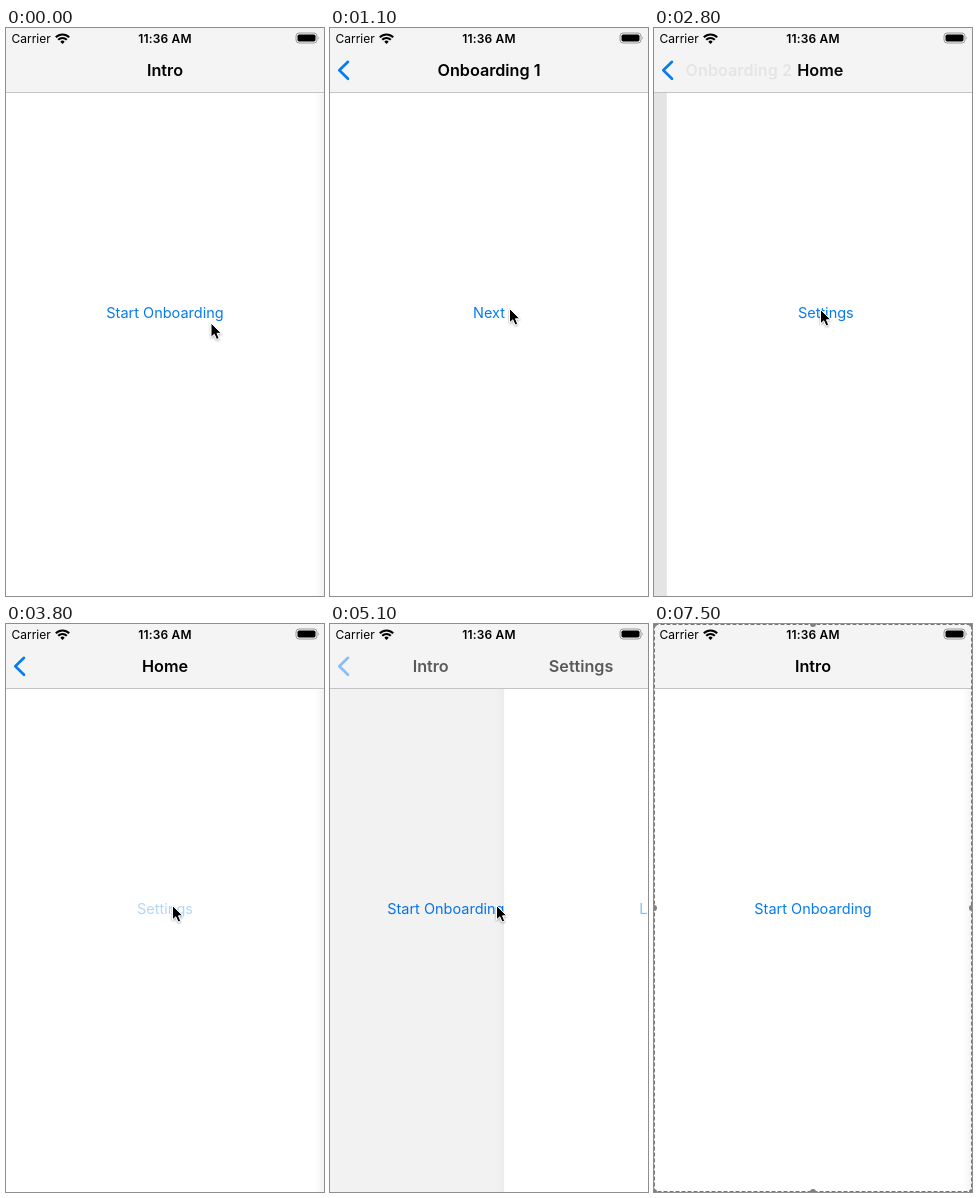
Animation, 318 px wide and 568 px high, one loop 7.6 s. Source, as an HTML page:

```html
<!DOCTYPE html>
<html lang="en">
<head>
<meta charset="utf-8">
<title>Onboarding flow</title>
<style>
  html, body { margin: 0; width: 100%; height: 100%; overflow: hidden; background: #fff; }
  svg { display: block; width: 318px; height: 568px; font-family: Inter, Roboto, sans-serif; }
  .button { font-size: 14.5px; fill: #067af0; text-anchor: middle; }
  .title { font-size: 16.2px; font-weight: 600; text-anchor: middle; }
  .status { font-size: 12px; }
  .clock { font-weight: 600; letter-spacing: .15px; text-anchor: middle; }
</style>
</head>
<body>
<svg viewBox="0 0 318 568">
  <defs>
    <linearGradient id="edge">
      <stop offset="0" stop-opacity="0"/>
      <stop offset="1" stop-opacity=".05"/>
    </linearGradient>
    <filter id="soft" x="-50%" y="-50%" width="200%" height="200%">
      <feDropShadow dx="0" dy="1" stdDeviation="1" flood-opacity=".35"/>
    </filter>
  </defs>

  <g id="under">
    <rect width="318" height="568" fill="#fff"/>
    <text class="button" x="159" y="289.7"></text>
  </g>
  <rect id="dim" width="318" height="568"/>
  <g id="over">
    <rect id="shadow" x="-9" width="9" height="568" fill="url(#edge)"/>
    <rect width="318" height="568" fill="#fff"/>
    <text class="button" x="159" y="289.7"></text>
  </g>

  <rect width="318" height="64" fill="#f4f4f4"/>
  <rect y="64" width="318" height="1" fill="#c4c4c4"/>
  <text class="title" id="underTitle" y="48"></text>
  <text class="title" id="overTitle" y="48"></text>
  <path id="chevron" d="M18 33.8 9.3 42.3 18 50.8" fill="none" stroke="#067af0" stroke-width="2.6" stroke-linecap="round" stroke-linejoin="round"/>

  <text class="status" x="5.5" y="14.5">Carrier</text>
  <text class="status clock" x="159" y="14.5">11:36 AM</text>
  <g fill="none" stroke="#000" stroke-width="2">
    <path d="M49.8 9.3a9.4 9.4 0 0 1 13.4 0"/>
    <path d="M52.2 11.8a6 6 0 0 1 8.6 0"/>
  </g>
  <path d="M54.3 13.7a3.1 3.1 0 0 1 4.4 0L56.5 16Z"/>
  <rect x="290" y="5" width="21" height="10" rx="3" fill="none" stroke="#999"/>
  <rect x="291.5" y="6.5" width="18" height="7" rx="1.7"/>
  <path d="M312.3 8.2q1.6 1.8 0 3.6Z" fill="#999"/>

  <g id="frame">
    <rect x=".5" y=".5" width="317" height="567" fill="none" stroke="#fff"/>
    <rect x=".5" y=".5" width="317" height="567" fill="none" stroke="#777" stroke-dasharray="4 2"/>
    <path d="M0 0h0M159 0h0M318 0h0M0 284h0M318 284h0M0 568h0M159 568h0M318 568h0" stroke="#808080" stroke-width="6" stroke-linecap="round"/>
  </g>
  <path id="cursor" d="M0 0V14.3L3.3 11.3 5.6 16.5 8.2 15.4 6 10.3H10.4Z" stroke="#fff" filter="url(#soft)"/>
</svg>
<script>
const LOOP = 7600, STEP = 100, W = 318, MID = W / 2, BACK_X = 28.5, OMEGA = 18;
const $ = id => document.getElementById(id);
const clamp = v => Math.min(1, Math.max(0, v));

const pages = {
  intro: ["Intro", "Start Onboarding"],
  first: ["Onboarding 1", "Next"],
  second: ["Onboarding 2", "Next"],
  home: ["Home", "Settings"],
  settings: ["Settings", "Logout"]
};

// lead: how long the button is held before the screens start to slide
const moves = [
  { at: 296, lead: 200, from: "intro", to: "first" },
  { at: 1480, lead: 100, from: "first", to: "second" },
  { at: 2522, lead: 30, from: "second", to: "home" },
  { at: 3858, lead: 160, from: "home", to: "settings" },
  { at: 4998, lead: 200, from: "settings", to: "intro", pop: true }
];

const cursorPath = [
  [0, 205, 295], [200, 201, 289], [500, 201, 289],
  [1000, 179.5, 280.5], [1100, 179.5, 280.5], [1400, 166.5, 281.5]
];

// Critically damped spring from 0 to 1
function spring(ms) {
  const x = OMEGA * Math.max(0, ms) / 1000;
  return x > 10.5 ? 1 : 1 - (1 + x) * Math.exp(-x);
}

function cursorAt(t) {
  const i = cursorPath.findIndex(point => point[0] > t);
  if (i < 0) return cursorPath.at(-1).slice(1);
  const [t0, x0, y0] = cursorPath[i - 1], [t1, x1, y1] = cursorPath[i];
  const k = (t - t0) / (t1 - t0);
  return [x0 + (x1 - x0) * k, y0 + (y1 - y0) * k];
}

function drawPage(id, page, x, alpha) {
  const group = $(id), label = group.querySelector("text");
  group.setAttribute("transform", `translate(${x})`);
  label.textContent = pages[page][1];
  label.setAttribute("opacity", alpha);
}

function drawTitle(id, page, alpha, place) {
  const title = $(id);
  title.textContent = pages[page][0];
  title.setAttribute("x", place(title.getComputedTextLength() / 2));
  title.setAttribute("opacity", alpha);
}

function draw(t) {
  // A move becomes current as soon as its button is pressed
  const move = moves.findLast(m => t >= m.at - m.lead) || moves[0];
  const { from, to, pop } = move;
  const age = t - move.at;
  const cover = ms => pop ? 1 - spring(ms) : spring(ms);
  const q = cover(age), titleQ = cover(age - (pop ? 12 : 0));
  const pressed = t < move.at - move.lead ? 1 : clamp(.3 + .7 * Math.max(0, age) / 350);
  const under = pop ? to : from, over = pop ? from : to;

  drawPage("under", under, -.3 * W * q, pop ? 1 : pressed);
  drawPage("over", over, W * (1 - q), pop ? pressed : 1);
  $("dim").setAttribute("opacity", .11 * q);
  $("shadow").setAttribute("opacity", 1 - q);

  drawTitle("underTitle", under, 1 - titleQ ** 1.5, half => MID + (BACK_X + half - MID) * titleQ);
  drawTitle("overTitle", over, titleQ ** .7, half => MID + (MID + half) * (1 - titleQ));
  $("chevron").setAttribute("opacity", pop || move === moves[0] ? q : 1);

  $("cursor").setAttribute("transform", `translate(${cursorAt(t)})`);
  $("cursor").setAttribute("opacity", t < 6700 ? 1 : 0);
  $("frame").setAttribute("opacity", clamp((t - 6600) / 500));
}

const start = performance.now();
function tick() {
  const t = (performance.now() - start) % LOOP;
  draw(Math.floor(t / STEP) * STEP);
  requestAnimationFrame(tick);
}
tick();
</script>
</body>
</html>
```
